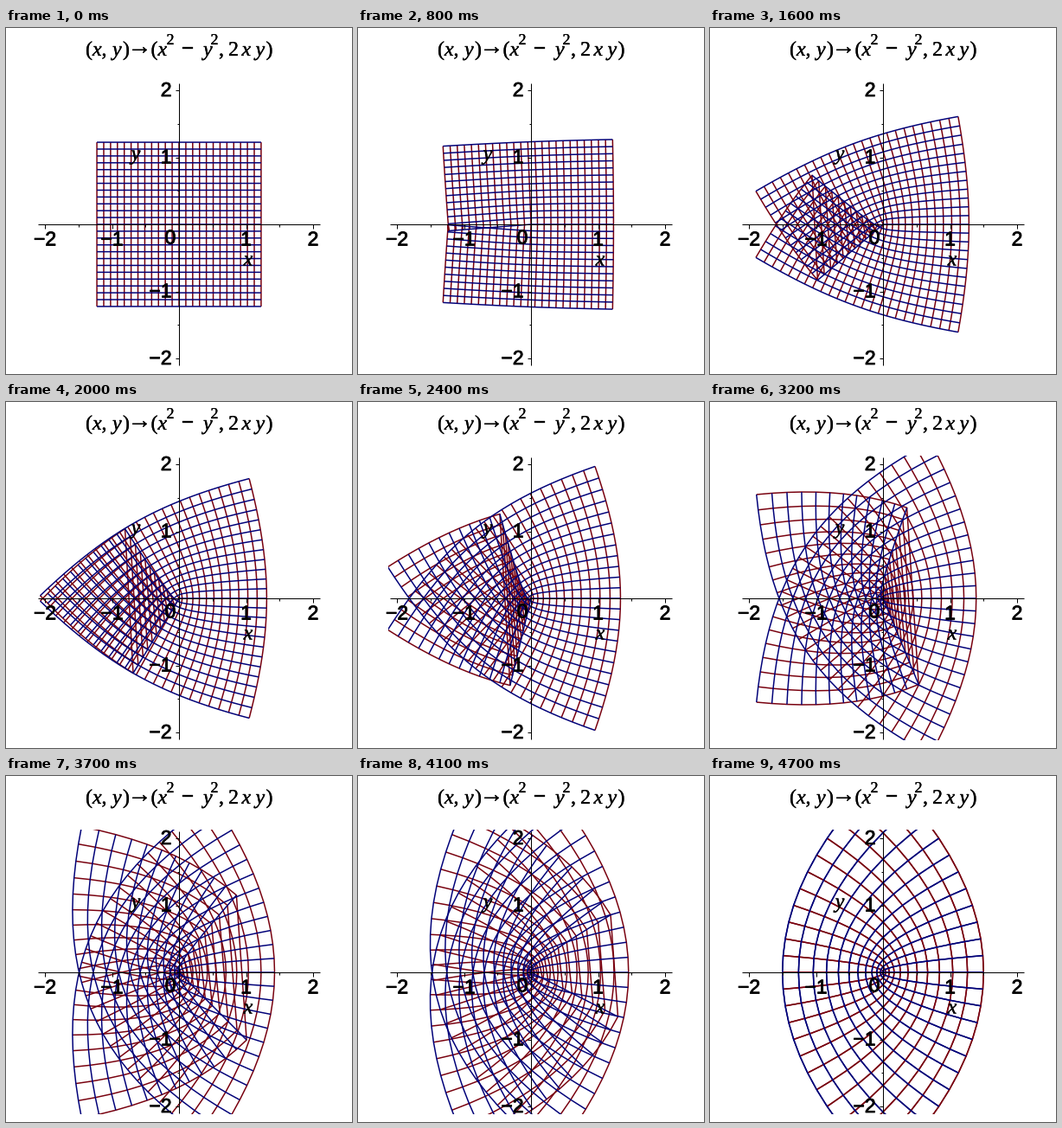
A matplotlib script for the animation above (6 s loop, 400x400 px).

```python
import numpy as np
import matplotlib.pyplot as plt
from matplotlib.animation import FuncAnimation
from matplotlib.collections import LineCollection
from matplotlib.patches import Rectangle
from matplotlib.patheffects import withStroke

SIZE, DPI = 400, 100
PT = 72 / DPI                   # points per pixel
CX, CY, UNIT = 200, 227, 77.5   # plot origin and pixels per unit
STEPS, HOLD = 40, 7
RED, NAVY = "#78000E", "#000078"
SERIF, SANS = "Liberation Serif", "Liberation Sans"

fig = plt.figure(figsize=(SIZE / DPI, SIZE / DPI), dpi=DPI, facecolor="white")
ax = fig.add_axes([0, 0, 1, 1])
ax.set_xlim(0, SIZE)
ax.set_ylim(SIZE, 0)
ax.axis("off")


def text(x, y, s, px=24, font=SERIF, italic=False, ha="left", weight=0.3):
    ax.text(x, y, s, fontsize=px * PT, family=font, ha=ha, va="baseline",
            style="italic" if italic else "normal", color="black", zorder=4,
            path_effects=[withStroke(linewidth=weight * PT,
                                     foreground="black")])


def tick_label(x, y, s, ha):
    text(x, y, s, 23, SANS, ha=ha, weight=0.8)


def rule(x0, y0, x1, y1):
    ax.plot([x0, x1], [y0, y1], color="black", lw=PT, zorder=3,
            solid_capstyle="butt", snap=True)


def draw_title():
    base = 32
    for x, s in [(92, "("), (110.5, ","), (135, ")"), (167.5, "("),
                 (246, ","), (257, "2"), (300.5, ")")]:
        text(x, base, s)
    for x, s in [(100, "x"), (123, "y"), (175.5, "x"), (228, "y"),
                 (272.5, "x"), (288.5, "y")]:
        text(x, base, s, italic=True)
    for x in (185.5, 236.5):
        text(x, 19, "2", px=18)
    text(140.5, 30, "→", px=28)
    text(202.5, base, "−", px=27)


def draw_axes():
    reach = 2.1 * UNIT
    rule(CX - reach, CY, CX + reach, CY)
    rule(CX, CY - reach, CX, CY + reach)
    for half in range(-4, 5):
        if half == 0:
            continue
        length = 2.5 if half % 2 else 4.5
        x, y = CX + half / 2 * UNIT, CY - half / 2 * UNIT
        rule(x, CY, x, CY + length)
        rule(CX - length, y, CX, y)
        if half % 2 == 0:
            label = str(half // 2).replace("-", "−")
            tick_label(x, 251.5, label, "center")
            tick_label(191.5, y + 7, label, "right")
    tick_label(190, 249.5, "0", "center")
    text(280, 274.5, "x", italic=True, ha="center")
    text(150, 152.5, "y", italic=True, ha="center")


draw_title()
draw_axes()

side = np.sqrt(1.5) * np.arange(-12, 13) / 12
X, Y = np.meshgrid(side, side)
RADIUS, ANGLE = np.hypot(X, Y), np.arctan2(Y, X)

window = Rectangle((35, 62), 330, 329, transform=ax.transData)


def add_curves(color, zorder):
    curves = LineCollection([], colors=color, linewidths=1.5 * PT,
                            zorder=zorder, snap=False)
    ax.add_collection(curves, autolim=False)
    curves.set_clip_path(window.get_path(), window.get_transform())
    return curves


verticals = add_curves(RED, 1)
horizontals = add_curves(NAVY, 2)


def update(i):
    # The grid is raised to a power running from 1 to 2, cut along x < 0.
    power = 1 + np.clip(i - HOLD, 0, STEPS) / STEPS
    r, a = RADIUS ** power, ANGLE * power
    points = np.stack([CX + UNIT * r * np.cos(a),
                       CY - UNIT * r * np.sin(a)], axis=-1)
    horizontals.set_segments(list(points))
    verticals.set_segments(list(points.swapaxes(0, 1)))
    return verticals, horizontals


anim = FuncAnimation(fig, update, frames=60, interval=100, repeat=True,
                     repeat_delay=0, blit=False)
plt.show()
```
